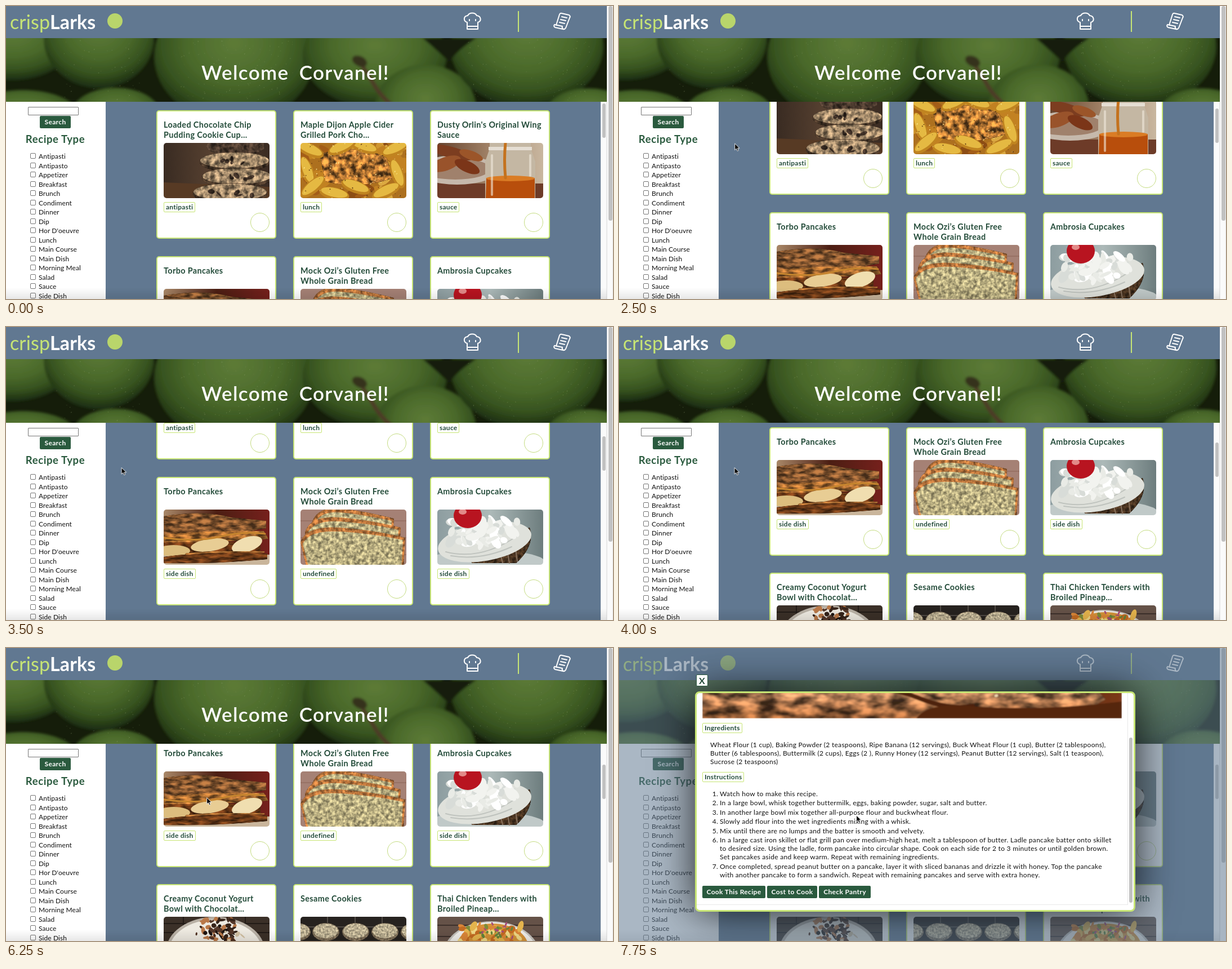
Write an HTML page that moves like this. It is 1078 px wide and 520 px high and loops after 8000 ms.

```html
<!DOCTYPE html>
<html lang="en">
<head>
<meta charset="utf-8">
<title>Recipe browser</title>
<style>
:root { --slate: #617891; --lime: #c7e574; --green: #2a5a3e; }
html, body { margin: 0; width: 100%; height: 100%; overflow: hidden; }
body { font: 12px/15px Lato, "Open Sans", sans-serif; color: #111; letter-spacing: .1px; }
#stage { position: relative; width: 1078px; height: 520px; overflow: hidden; background: #fff; }
#stage div, #stage svg { position: absolute; box-sizing: border-box; white-space: nowrap; }

.head { left: 0; top: 0; width: 1067px; height: 57px; background: var(--slate); }
.brand { left: 7px; top: 6px; font-size: 34px; line-height: 44px; color: var(--lime); }
.brand b { color: #fff; }
.mark { left: 180px; top: 13px; width: 27px; height: 27px; border-radius: 50%; background: #b9d56b; }
.rule { left: 909px; top: 9px; width: 2px; height: 37px; background: var(--lime); }
.banner { left: 0; top: 57px; width: 1067px; height: 113px; }
.hello { left: 0; width: 1028px; top: 95px; text-align: center; font: 600 35px/44px Lato, sans-serif; letter-spacing: 1.4px; word-spacing: 8px; color: #fff; }

.side { left: 0; top: 170px; width: 177px; height: 350px; background: #fff; }
.field { left: 39px; top: 9px; width: 90px; height: 15px; border: 1px solid #767676; border-radius: 1px; }
.btn { height: 22px; border-radius: 2px; background: var(--green); color: #fff; font-weight: 700; line-height: 22px; text-align: center; letter-spacing: .35px; }
.kind { left: 0; width: 175px; top: 54px; text-align: center; font: 700 18.5px/24px Lato, sans-serif; letter-spacing: .6px; color: var(--green); }
.opt { left: 58px; }
.opt::before { content: ""; position: absolute; left: -15px; top: 2px; width: 8px; height: 8px; border: 1px solid #767676; border-radius: 2px; }

.main { left: 177px; top: 170px; width: 879px; height: 350px; background: var(--slate); overflow: hidden; }
.list { left: 0; top: 0; width: 879px; height: 800px; animation: scroll 8s step-end infinite; }
.card { width: 213px; height: 228px; border: 2px solid var(--lime); border-radius: 5px; background: #fff; }
.card > h3 { position: absolute; margin: 0; left: 11px; top: 15px; font-size: 14.4px; line-height: 18px; letter-spacing: .38px; color: #234b39; }
.card > svg { left: 11px; top: 56px; width: 188px; height: 98px; border-radius: 5px; }
.tag { height: 18px; padding: 0 3px; border: 1px solid var(--lime); border-radius: 2px; font-weight: 700; line-height: 16px; color: #234b39; background: #fff; letter-spacing: .25px; }
.card .tag { left: 11px; top: 161px; }
.fav { left: 165px; top: 180px; width: 34px; height: 34px; border: 1px solid #c4dc80; border-radius: 50%; }

.track { background: #fafafa; border: solid #e8e8e8; border-width: 0 1px; }
.thumb { border-radius: 4px; background: #c1c1c1; }
.t1 { left: 1059px; top: 173px; width: 6px; height: 61px; animation: thumb 8s step-end infinite; }
.t2 { left: 1070px; top: 0; width: 7px; height: 381px; }
.fade { left: 0; top: 500px; width: 1067px; height: 20px; background: linear-gradient(#0000, #00000018); }

.shade { inset: 0; background: #61789188; visibility: hidden; animation: open 8s step-end infinite; }
.modal { left: 134.5px; top: 76.5px; width: 782px; height: 391px; border: 3px solid var(--lime); border-radius: 8px; background: #fff; box-shadow: 0 0 75px #000c; }
.close { left: 137px; top: 47px; width: 21px; height: 21px; border: 1px solid var(--green); border-radius: 2px; background: #fff; color: #234b39; font: 700 16px/19px Lato, sans-serif; text-align: center; }
.pane { left: 138px; top: 79.5px; width: 766px; height: 376.5px; overflow: hidden; border: solid #e8e8e8; border-width: 0 1px 1px 0; letter-spacing: .29px; }
.body { left: -138px; top: -79.5px; width: 904px; height: 555px; animation: read 8s step-end infinite; }
.body > svg { left: 148px; top: 90px; width: 745px; height: 134px; border-radius: 5px 5px 0 0; }
.name { left: 148px; top: 125px; width: 745px; text-align: center; font: 700 23.5px/32px Lato, sans-serif; color: #fff; text-shadow: 1px 2px 3px #000a; }
.num { left: 148px; width: 28px; text-align: right; }
.t3 { left: 906px; top: 82px; width: 6px; height: 293px; animation: bar 8s step-end infinite; }
.cursor { left: 0; top: 0; width: 12px; height: 16px; visibility: hidden; animation: show 8s step-end infinite, point 8s step-end infinite; }

@keyframes scroll {
  0% { transform: none; }
  28.125% { transform: translateY(-3px); }
  31.25% { transform: translateY(-78px); }
  34.375% { transform: translateY(-133px); }
  37.5% { transform: translateY(-159px); }
  40.625% { transform: translateY(-172px); }
  43.75% { transform: translateY(-178px); }
  46.875% { transform: translateY(-228px); }
  50% { transform: translateY(-266px); }
  53.125%, 100% { transform: translateY(-283px); }
}
@keyframes thumb {
  0% { transform: none; }
  31.25% { transform: translateY(9px); }
  34.375% { transform: translateY(15px); }
  37.5% { transform: translateY(19px); }
  40.625% { transform: translateY(20px); }
  43.75% { transform: translateY(21px); }
  46.875% { transform: translateY(27px); }
  50% { transform: translateY(32px); }
  53.125%, 100% { transform: translateY(34px); }
}
@keyframes open { 0% { visibility: hidden; } 81.25%, 100% { visibility: visible; } }
@keyframes read { 0% { transform: none; } 93.75% { transform: translateY(-60px); } 96.875%, 100% { transform: translateY(-99px); } }
@keyframes bar { 0% { transform: none; } 93.75% { transform: translateY(47px); } 96.875%, 100% { transform: translateY(77px); } }
@keyframes show { 0% { visibility: hidden; } 12.5%, 100% { visibility: visible; } }
@keyframes point {
  0% { transform: translate(439px, 7px); }
  15.625% { transform: translate(335px, 113px); }
  18.75% { transform: translate(238px, 174px); }
  21.875% { transform: translate(205px, 243px); }
  25% { transform: translate(205px, 243.5px); }
  34.375% { transform: translate(204px, 248.5px); }
  37.5% { transform: translate(204.5px, 249px); }
  56.25% { transform: translate(241px, 276.5px); }
  59.375% { transform: translate(353.5px, 279px); }
  62.5% { transform: translate(371.5px, 272px); }
  75% { transform: translate(356px, 265px); }
  90.625% { transform: translate(413px, 297px); }
  93.75%, 100% { transform: translate(421px, 296.5px); }
}
</style>
</head>
<body>
<div id="stage">
  <div class="head">
    <div class="brand">crisp<b>Larks</b></div>
    <div class="mark"></div>
    <svg style="left:812px;top:10px" width="33" height="33" fill="none" stroke="#fff" stroke-width="2" stroke-linecap="round" stroke-linejoin="round">
      <path d="M7 31V19C0 17 0 8 8 7C11 1 21 1 24 7C32 8 33 17 26 19V31ZM7 26H26M11 14V16M22 14V16"/>
    </svg>
    <div class="rule"></div>
    <svg style="left:971px;top:10px" width="34" height="34" fill="none" stroke="#fff" stroke-width="2" stroke-linecap="round" stroke-linejoin="round">
      <path d="M6 24L12 5Q13 2 16 3L29 6Q32 8 30 11L23 29Q21 32 18 31L4 28Q1 26 3 23L17 26Q16 30 19 31M16 9L25 11M14 14L23 16M12 19L21 21"/>
    </svg>
  </div>
  <svg class="banner" id="banner" viewBox="0 57 1067 113"></svg>
  <div class="hello">Welcome Corvanel!</div>
  <div class="side" id="side">
    <div class="field"></div>
    <div class="btn" style="left:60px;top:25px;width:55px">Search</div>
    <div class="kind">Recipe Type</div>
  </div>
  <div class="main"><div class="list" id="list"></div></div>
  <div class="track" style="left:1056px;top:170px;width:11px;height:350px"></div>
  <div class="thumb t1"></div>
  <div class="track" style="left:1067px;top:0;width:11px;height:520px"></div>
  <div class="thumb t2"></div>
  <div class="fade"></div>
  <div class="shade">
    <div class="modal"></div>
    <div class="close">X</div>
    <div class="pane"><div class="body" id="body"></div></div>
    <div class="thumb t3"></div>
  </div>
  <svg class="cursor" viewBox="0 0 12 16"><path d="M.7.700V12L3.400 9.600 5.200 13.700 7.200 12.800 5.500 8.900H9.200Z" fill="#000" stroke="#fff" stroke-width=".9"/></svg>
</div>
<script>
const $ = id => document.getElementById(id);

let seed = 7;
const rnd = () => (seed = seed * 16807 % 2147483647) / 2147483647;
const E = (x, y, rx, ry, fill, turn = 0) =>
  `<ellipse cx="${x}" cy="${y}" rx="${rx}" ry="${ry}" fill="${fill}" transform="rotate(${turn} ${x} ${y})"/>`;
const R = (x, y, w, h, fill) => `<rect x="${x}" y="${y}" width="${w}" height="${h}" fill="${fill}"/>`;
const P = (d, fill) => `<path d="${d}" fill="${fill}"/>`;
const L = (d, color, w) => `<path d="${d}" fill="none" stroke="${color}" stroke-width="${w}" stroke-linecap="round"/>`;
// Scatter small blobs over a box
const dots = (n, x, y, w, h, r, colors) => Array.from({ length: n }, () =>
  E((x + rnd() * w).toFixed(1), (y + rnd() * h).toFixed(1), (r * (.5 + rnd())).toFixed(1), (r * (.3 + rnd() * .6)).toFixed(1),
    colors[rnd() * colors.length | 0], (rnd() * 180).toFixed(0))).join("");
const grad = (id, stops, attrs = "") => `<linearGradient id="${id}" ${attrs}>${stops.map((c, i) =>
  `<stop offset="${i / (stops.length - 1)}" stop-color="${c}"/>`).join("")}</linearGradient>`;
const soft = (id, blur, art) => `<defs><filter id="${id}" x="-5%" y="-5%" width="110%" height="110%"><feGaussianBlur stdDeviation="${blur}"/></filter></defs><g filter="url(#${id})">${art}</g>`;
// Shade the art with grainy noise, like crust or crumb
const rough = (id, freq, art, depth = 1) => `<defs><filter id="${id}" x="0" y="0" width="100%" height="100%" color-interpolation-filters="sRGB">
  <feTurbulence type="fractalNoise" baseFrequency="${freq}" numOctaves="3" seed="4"/>
  <feColorMatrix values="2 0 0 0 -.5 2 0 0 0 -.5 2 0 0 0 -.5 0 0 0 0 1" result="n"/>
  <feComposite in="SourceGraphic" in2="n" operator="arithmetic" k1="${depth}" k2="${1 - depth / 2}"/></filter></defs><g filter="url(#${id})">${art}</g>`;

const apple = (x, y, rx, ry, turn) => E(x, y, rx, ry, "url(#skin)", turn);
const drops = (n, x, w) => dots(n, x, 60, w, 108, .8, ["#a3b38555", "#8ea36a55"]);
$("banner").innerHTML = `<defs><radialGradient id="skin" cx=".5" cy=".4" r=".58">
  <stop offset="0" stop-color="#5d7b37"/><stop offset=".5" stop-color="#4b6a2b"/><stop offset=".8" stop-color="#36521f"/><stop offset="1" stop-color="#1f3112"/></radialGradient></defs>` +
  R(0, 57, 1067, 113, "#151d0a") + soft("bs", 2,
    apple(10, 62, 110, 70) + apple(30, 195, 100, 46) + apple(165, 58, 98, 88) + apple(195, 190, 78, 45) +
    apple(405, 90, 142, 118) + apple(655, 88, 128, 92) + apple(745, 180, 90, 76) + apple(925, 72, 136, 108) + apple(1035, 190, 76, 44) +
    P("M740 57H835Q796 82 788 100Q765 78 740 57Z", "#181b10") +
    L("M626 97Q644 122 654 140T684 175", "#4d3a25", 7) + E(628, 98, 14, 9, "#34301a", 25)) +
  drops(130, 300, 210) + drops(110, 820, 220) + drops(60, 90, 150);

const kinds = "Antipasti,Antipasto,Appetizer,Breakfast,Brunch,Condiment,Dinner,Dip,Hor D'oeuvre,Lunch,Main Course,Main Dish,Morning Meal,Salad,Sauce,Side Dish".split(",");
$("side").innerHTML += kinds.map((k, i) => `<div class="opt" style="top:${89 + i * 16.5}px">${k}</div>`).join("");

const cookie = (x, y, w, h) => E(x, y, w, h, "#463527") + E(x, y - 3, w - 1, h - 4, "#a08768") +
  dots(5, x - w * .7, y - 6, w * 1.3, 10, 5, ["#3b2d24"]);
const disc = (x, y) => E(x, y + 2, 24, 16, "#7c6d57") + E(x, y, 22, 13, "#bcb092");

const photos = [
  () => grad("g0", ["#392b22", "#5a4332", "#3a2b22"]) + R(0, 0, 188, 98, "url(#g0)") + P("M0 70L188 78V98H0Z", "#573a24") +
    rough("r0", .12, E(128, 6, 52, 17, "#4b3a2e") + cookie(126, 34, 62, 18) + cookie(130, 62, 62, 18) + cookie(118, 90, 66, 19)),
  () => R(0, 0, 188, 98, "#ad701f") + dots(60, 0, 0, 188, 98, 11, ["#cf9530", "#8d4d14", "#c28122", "#dba941", "#a35d18"]) +
    rough("r1", .1, P("M34 20Q100 0 152 26L166 62Q100 84 44 68Z", "#b07332"), 1.3) +
    [[16, 12, 25], [12, 50, 70], [22, 78, -40], [60, 90, 12], [98, 78, 20], [112, 6, 20], [169, 10, -25], [172, 55, 70], [152, 86, -25], [74, 7, 155]]
      .map(([x, y, a]) => E(x, y, 27, 11, "#c08420", a) + E(x, y - 2, 24, 8, "#e5b942", a)).join("") + dots(90, 0, 0, 188, 98, 1, ["#5b3512", "#fff0a0"]),
  () => grad("g2", ["#66442f", "#a28368", "#c9b7a0"]) + R(0, 0, 188, 98, "url(#g2)") + R(0, 72, 188, 26, "#6d3b28") +
    E(35, 48, 72, 26, "#c6b9ac") + E(32, 46, 62, 19, "#a0816c") + E(25, 17, 40, 10, "#7c3d20", 15) + E(15, 37, 28, 12, "#99532b", -20) + E(53, 42, 24, 10, "#7b3518", 25) + E(60, 22, 22, 8, "#9b5529", 20) +
    P("M93 0H166V10L174 33V98H85V33L93 10Z", "#c4b7a3") + R(91, 7, 77, 6, "#e5ded3") + P("M87 62Q130 67 173 62V98H86Z", "#b84e0c") + E(130, 63, 43, 5, "#da7c25") +
    L("M121 0Q118 30 121 62", "#c4721e", 5) + L("M97 22V92M165 22V58", "#f2e9dc99", 4),
  () => grad("g3", ["#a98868", "#4b1e13", "#76201c"]) + R(0, 0, 188, 98, "url(#g3)") + R(0, 80, 188, 18, "#c9b59b") +
    rough("r3", ".06 .16", P("M0 12Q70 0 120 14L182 20V33L130 42L0 48Z", "#85562f") + P("M0 44Q95 36 178 38L186 52L30 62L0 58Z", "#a2672f") + P("M0 58H172V78H0Z", "#693716")) +
    E(18, 73, 29, 10, "#dcbd7e") + E(82, 63, 34, 11, "#e8cd94", -8) + E(148, 62, 28, 13, "#f0deb0", -18) + L("M0 50Q60 58 100 48T180 43", "#c6852f", 3) +
    rough("r4", ".05 .2", P("M0 84Q90 72 184 78V88Q90 97 0 95Z", "#6b3a18") + L("M40 79Q90 73 178 75", "#9f6630", 3)),
  () => R(0, 0, 188, 98, "#a58175") + L("M0 20H188M0 50H188M0 80H188", "#8a6255", 1) +
    rough("r5", .16, [[0, 20], [16, 8], [34, 0]].map(([y, x]) =>
      P(`M${x} ${y + 24}Q${x + 10} ${y - 6} 70 ${y - 2}T${186 - x} ${y + 16}L${182 - x} ${y + 90}H16Z`, "#b8743c") +
      P(`M${x + 4} ${y + 27}Q${x + 14} ${y + 2} 70 ${y + 5}T${182 - x} ${y + 20}L${178 - x} ${y + 90}H20Z`, "#b8ad80")).join(""), .7),
  () => grad("g5", ["#8d9da0", "#acb9b8", "#6d7d7e"]) + R(0, 0, 188, 98, "url(#g5)") + E(85, 92, 105, 20, "#c0c9c8") +
    rough("r6", .15, P("M42 74L164 32Q174 64 140 95H62Z", "#46311f")) + L("M116 94L111 77M128 95L124 72M142 92L138 64", "#86705d", 2) +
    E(84, 57, 84, 34, "#dfe1db", -10) + L("M15 75Q76 91 140 48M24 82Q78 91 132 66", "#bfc3be", 2) + dots(75, 22, 20, 124, 42, 9, ["#f2f3ef", "#e9ebe6", "#d8dcd8", "#fff"]) +
    E(54, 11, 25, 22, "#b81420") + E(45, 4, 7, 5, "#e28a88"),
  () => R(0, 0, 188, 98, "#3b3028") + L("M0 12H188M0 28H188M35 0V98M145 0V98", "#221b17", 2) + E(92, 62, 88, 62, "#b9b1a6") + E(92, 62, 83, 57, "#eeeae1") +
    dots(60, 65, 3, 62, 38, 5, ["#35231a", "#55382a", "#1d1410", "#b97848"]) + dots(20, 40, 20, 110, 50, 4, ["#4b2c1d", "#d2c0a2"]),
  () => R(0, 0, 188, 98, "#26221f") + L("M0 18H188M0 60H188M48 0V98M97 0V98M145 0V98", "#5f5852", 1.5) +
    rough("r7", .3, [25, 65, 105].map(y => [-6, 45, 98, 150, 202].map(x => disc(x, y)).join("")).join(""), .5),
  () => R(0, 0, 188, 98, "#655248") + L("M0 15H188M0 35H188M0 62H188", "#3d302b", 2) + E(96, 68, 86, 60, "#c4c1bb") + E(96, 66, 81, 56, "#f0eeea") + E(98, 55, 64, 43, "#d49238") +
    dots(80, 42, 16, 110, 50, 7, ["#e5b44d", "#c36b22", "#f0d987", "#7d8b39", "#db8638"]) + dots(22, 75, 12, 60, 25, 3, ["#64843a", "#a64b77"])
];

const cards = [
  ["Loaded Chocolate Chip<br>Pudding Cookie Cup...", "antipasti"], ["Maple Dijon Apple Cider<br>Grilled Pork Cho...", "lunch"], ["Dusty Orlin's Original Wing<br>Sauce", "sauce"],
  ["Torbo Pancakes", "side dish"], ["Mock Ozi’s Gluten Free<br>Whole Grain Bread", "undefined"], ["Ambrosia Cupcakes", "side dish"],
  ["Creamy Coconut Yogurt<br>Bowl with Chocolat...", "breakfast"], ["Sesame Cookies", "dessert"], ["Thai Chicken Tenders with<br>Broiled Pineap...", "lunch"]
];
$("list").innerHTML = cards.map(([title, tag], i) =>
  `<div class="card" style="left:${90 + i % 3 * 243}px;top:${15 + (i / 3 | 0) * 258.5}px"><h3>${title}</h3>
  <svg viewBox="0 0 188 98">${soft("s" + i, .6, photos[i]())}</svg><div class="tag">${tag}</div><div class="fav"></div></div>`).join("");

const crust = grad("gm", ["#54290f", "#4a2210", "#2c110a", "#7d3a1a"]) + R(0, 0, 745, 134, "url(#gm)") +
  grad("gc", ["#8d5a36", "#b78560", "#8a5530"], 'x2="0" y2="1"') +
  rough("rm", ".03 .07", P("M0 36Q120 12 250 22Q330 22 400 46Q560 48 690 72L716 100L660 134H0Z", "url(#gc)"), 1.3) +
  L("M250 75Q330 76 385 98T480 112", "#4d2410", 8) + P("M380 134Q400 106 470 112Q600 122 745 104V134Z", "#54260f") +
  L("M410 56Q560 58 690 80", "#c79a6c", 4) + dots(7, 450, 55, 230, 50, 4, ["#f0d6ae"]);

const line = (x, y, text, cls = "") => `<div class="${cls}" style="left:${x}px;top:${y - 7.5}px">${text}</div>`;
const label = (y, text) => `<div class="tag" style="left:148px;top:${y}px">${text}</div>`;
const button = (x, w, text) => `<div class="btn" style="left:${x}px;top:521px;width:${w}px">${text}</div>`;
const steps = [
  [357, "Watch how to make this recipe."],
  [373.5, "In a large bowl, whisk together buttermilk, eggs, baking powder, sugar, salt and butter."],
  [390, "In another large bowl mix together all-purpose flour and buckwheat flour."],
  [406.5, "Slowly add flour into the wet ingredients mixing with a whisk."],
  [423, "Mix until there are no lumps and the batter is smooth and velvety."],
  [439.5, "In a large cast iron skillet or flat grill pan over medium-high heat, melt a tablespoon of butter. Ladle pancake batter onto skillet<br>to desired size. Using the ladle, form pancake into circular shape. Cook on each side for 2 to 3 minutes or until golden brown.<br>Set pancakes aside and keep warm. Repeat with remaining ingredients."],
  [486, "Once completed, spread peanut butter on a pancake, layer it with sliced bananas and drizzle it with honey. Top the pancake<br>with another pancake to form a sandwich. Repeat with remaining pancakes and serve with extra honey."]
];
$("body").innerHTML = `<svg viewBox="0 0 745 134">${soft("sm", 1.2, crust)}</svg><div class="name">Torbo Pancakes</div>` +
  label(232, "Ingredients") +
  line(162, 270, "Wheat Flour (1 cup), Baking Powder (2 teaspoons), Ripe Banana (12 servings), Buck Wheat Flour (1 cup), Butter (2 tablespoons),<br>Butter (6 tablespoons), Buttermilk (2 cups), Eggs (2 ), Runny Honey (12 servings), Peanut Butter (12 servings), Salt (1 teaspoon),<br>Sucrose (2 teaspoons)") +
  label(319, "Instructions") +
  steps.map(([y, text], i) => line(148, y, i + 1 + ".", "num") + line(179, y, text)).join("") +
  button(148, 112, "Cook This Recipe") + button(263, 89, "Cost to Cook") + button(355, 92, "Check Pantry");
</script>
</body>
</html>
```
